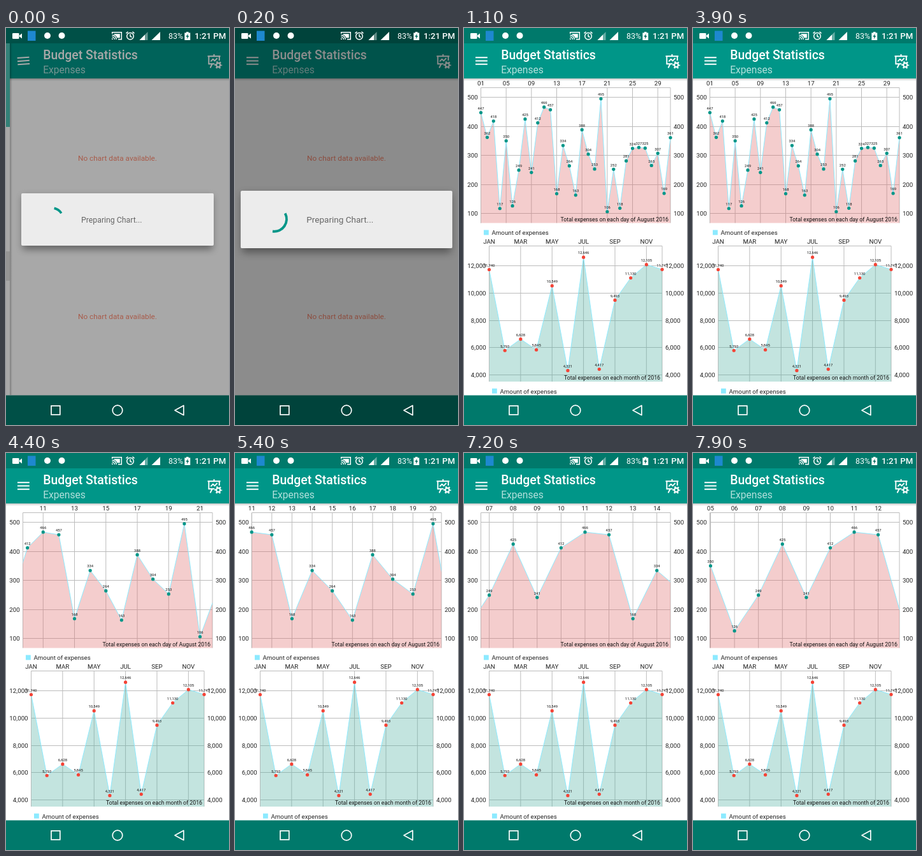
These frames come from a looping animation (350x622 px, 8000 ms). An HTML page:

```html
<!DOCTYPE html>
<html lang="en">
<head>
<meta charset="utf-8">
<title>Budget Statistics</title>
<style>
  html, body { margin: 0; width: 100%; height: 100%; overflow: hidden; background: #fff; }
  svg { display: block; width: 100vw; height: 100vh; }
  text { font-family: Roboto, "Noto Sans", sans-serif; white-space: pre; }
  .axis { font-size: 9.72px; fill: #222; }
  .value { font-size: 5.83px; fill: #111; text-anchor: middle; }
  .note { font-size: 8.75px; fill: #111; text-anchor: end; }
  .empty { font-size: 11.8px; fill: #ff8a70; text-anchor: middle; }
  .mid { text-anchor: middle; }
  .end { text-anchor: end; }
  .grid { stroke: #bcbcbc; fill: none; }
  .line { stroke: #8ceaff; fill: none; }
</style>
</head>
<body>
<svg viewBox="0 0 350 622" preserveAspectRatio="none">
  <defs>
    <clipPath id="clipDay"><rect x="26.5" y="93.5" width="297.5" height="212"/></clipPath>
    <clipPath id="clipMonth"><rect x="39.5" y="341.5" width="271.5" height="212.5"/></clipPath>
    <linearGradient id="fall" x2="0" y2="1">
      <stop stop-color="#000" stop-opacity=".22"/><stop offset="1" stop-color="#000" stop-opacity="0"/>
    </linearGradient>
    <linearGradient id="side">
      <stop stop-color="#000" stop-opacity=".25"/><stop offset="1" stop-color="#000" stop-opacity="0"/>
    </linearGradient>
    <filter id="blur" x="-20%" y="-40%" width="140%" height="180%"><feGaussianBlur stdDeviation="6"/></filter>
  </defs>

  <rect width="350" height="622" fill="#fff"/>
  <g id="empty">
    <text class="empty" x="175" y="207.5">No chart data available.</text>
    <text class="empty" x="175" y="456">No chart data available.</text>
  </g>
  <g id="charts"><g id="day"></g><g id="month"></g></g>

  <rect y="79" width="350" height="4" fill="url(#fall)"/>
  <rect y="24" width="350" height="55" fill="#009688"/>
  <text x="58.2" y="49" font-size="19.44" font-weight="500" fill="#fff">Budget Statistics</text>
  <text x="58.2" y="71" font-size="15.6" fill="#fff" opacity=".7">Expenses</text>
  <path id="menu" d="M18 46.3H36.8M18 51.5H36.8M18 56.7H36.8" stroke="#fff" stroke-width="2"/>
  <g fill="none" stroke="#fff" stroke-width="1.9">
    <path d="M316.5 44.2H336.5M318.3 44V56.3H328M334.8 44V51M326.5 41V44M323.5 56.5L320.5 62.5M321.3 52.3L324.8 48.8L327.6 51.4L331.6 47.2"/>
    <circle cx="333.2" cy="58" r="6.6" fill="#009688" stroke="none"/>
    <circle cx="333.2" cy="58" r="3.1" stroke-width="2.2"/>
    <circle cx="333.2" cy="58" r="5" stroke-width="2" stroke-dasharray="2.4 2.836" stroke-dashoffset="1.2"/>
  </g>

  <g id="drawer">
    <rect x="6" y="24" width="4" height="551" fill="url(#side)"/>
    <rect y="24" width="6" height="551" fill="#fff"/>
    <rect y="24" width="6" height="131" fill="#4dc3b6"/>
    <rect y="350" width="6" height="46" fill="#e2e2e2"/>
  </g>

  <rect width="350" height="24" fill="#00796b"/>
  <rect y="575.5" width="350" height="46.5" fill="#00796b"/>
  <rect id="dim" width="350" height="622" fill="#000"/>

  <g fill="#fff">
    <rect x="10" y="8" width="10.5" height="9" rx="1.2"/>
    <path d="M20 12.5L25 8.5V16.5Z"/>
    <rect x="34" y="4.5" width="12.5" height="15.5" fill="#1e88cf"/>
    <circle cx="65" cy="12" r="5"/>
    <circle cx="87.500" cy="12" r="5"/>
    <g fill="none" stroke="#fff" stroke-width="1.5">
      <path d="M166.700 9V6.700H181.300V17.800H176"/>
      <path d="M166.500 11.200A6.700 6.700 0 0 1 173.200 18M166.500 14A4 4 0 0 1 170.400 18"/>
      <circle cx="195" cy="12.700" r="5.300"/>
      <path d="M195 9.500V13L197.500 14.500M188.500 8.300L191.500 5.800M201.500 8.300L198.500 5.800"/>
    </g>
    <path d="M169.500 9.200H178.800V15.400H174.500Q173 11.500 169.500 10.500ZM166 16A2 2 0 0 1 168 18H166Z"/>
    <path d="M222.500 6V19H209.500Z" opacity=".4"/>
    <path d="M218 10.500V19H209.500Z"/>
    <path d="M242 6V19H228.500Z"/>
    <text x="255" y="17" font-size="12.4">83%</text>
    <path d="M280.300 7.500H283V6H286.500V7.500H289.200V19H280.300Z"/>
    <path d="M285.800 8.800L282.300 13.800H284.500L283.800 17.500L287.300 12.300H285.100Z" fill="#00695c"/>
    <text x="296" y="17" font-size="13.2" font-weight="500">1:21 PM</text>
  </g>
  <g fill="none" stroke="#fff" stroke-width="1.7">
    <rect x="71" y="592" width="13.800" height="13.800"/>
    <circle cx="175" cy="599" r="7.800"/>
    <path d="M265 599L278.800 591.500V606.500Z" stroke-linejoin="round"/>
  </g>

  <g id="dialog">
    <rect x="26" y="264" width="298" height="83" fill="#000" opacity=".4" filter="url(#blur)"/>
    <rect x="24" y="259" width="302" height="82" rx="2" fill="#ececec"/>
    <path id="spinner" fill="none" stroke="#009688" stroke-width="3.6"/>
    <text x="118" y="304.500" font-size="12.3" fill="#666">Preparing Chart...</text>
  </g>
</svg>
<script>
const LOOP = 8000, STEP = 100;
const $ = id => document.getElementById(id);

const days = [447, 362, 418, 117, 350, 126, 249, 425, 241, 412, 466, 457, 168, 334, 264, 163,
  388, 304, 253, 495, 106, 252, 118, 281, 324, 327, 325, 265, 307, 169, 361];
const months = [11740, 5793, 6628, 5845, 10549, 4321, 12646, 4417, 9493, 11130, 12105, 11747];

const dayChart = {
  values: days, names: days.map((_, i) => String(i + 1).padStart(2, '0')),
  left: 26.5, right: 324, top: 93.5, bottom: 305.5,
  base: 100, baseY: 290.5, unit: 0.455, ticks: [100, 200, 300, 400, 500], labelRoom: 3.1,
  fill: 'rgba(222,105,105,.333)', dot: '#009688', clip: 'clipDay',
  note: 'Total expenses on each day of August 2016', legendY: 324.3
};
const monthChart = {
  values: months, names: 'JAN FEB MAR APR MAY JUN JUL AUG SEP OCT NOV DEC'.split(' '),
  left: 39.5, right: 311, top: 341.5, bottom: 554,
  base: 4000, baseY: 543.5, unit: 0.02132, ticks: [4000, 6000, 8000, 10000, 12000], labelRoom: 2,
  fill: 'rgba(75,174,159,.333)', dot: '#f44336', clip: 'clipMonth',
  note: 'Total expenses on each month of 2016', legendY: 572.6
};

const text = (cls, x, y, str) => `<text class="${cls}" x="${x}" y="${y}">${str}</text>`;
const number = v => v.toLocaleString('en-US');
const snap = y => Math.floor(y) + 0.5;

// Linear track through [time, value] pairs, held at both ends.
function track(keys, t) {
  if (t <= keys[0][0]) return keys[0][1];
  for (let i = 1; i < keys.length; i++) {
    const [t0, a] = keys[i - 1], [t1, b] = keys[i];
    if (t <= t1) return a + (b - a) * (t - t0) / (t1 - t0);
  }
  return keys[keys.length - 1][1];
}

function drawChart(c, phase, scale, shift) {
  const { left, right, top, bottom } = c;
  const gap = (right - left) / (c.values.length - 1) * scale;
  const xAt = i => left + i * gap + shift;
  const yAt = v => c.baseY - (v - c.base) * c.unit;
  const inside = x => x > left - 0.4 && x < right + 0.4;
  const every = Math.ceil(c.labelRoom / scale);
  let grid = `M${left} ${top}H${right}V${bottom}M${left} ${top}V${bottom}`;
  let labels = '', dots = '', tags = '';

  for (const v of c.ticks) {
    const y = yAt(v);
    grid += `M${left} ${snap(y)}H${right}`;
    labels += text('axis end', left - 4.9, y + 3.5, number(v)) + text('axis', right + 4.9, y + 3.5, number(v));
  }
  const points = c.values.map((v, i) => {
    const x = xAt(i), y = yAt(v * phase);
    if (inside(x)) {
      if (i % every === 0) {
        grid += `M${x} ${top}V${bottom}`;
        labels += text('axis mid', x, top - 3.7, c.names[i]);
      }
      if (y < bottom) {
        dots += `<circle cx="${x}" cy="${y}" r="2.6" fill="${c.dot}"/>`;
        tags += text('value', x, y - 4.7, number(v));
      }
    }
    return `${x} ${y}`;
  }).join('L');

  return `<path class="grid" d="${grid}"/>
    <g clip-path="url(#${c.clip})">
      <path d="M${xAt(0)} ${bottom + 60}L${points}V${bottom + 60}Z" fill="${c.fill}"/>
      <path class="line" d="M${points}"/>
    </g>${labels}${dots}${tags}
    <rect x="${left + 4.5}" y="${c.legendY - 7.8}" width="7.8" height="7.8" fill="#8ceaff"/>
    ${text('axis', left + 17, c.legendY, 'Amount of expenses')}
    ${text('note', right - 3, bottom - 2.7, c.note)}`;
}

function drawDialog(t) {
  const grow = track([[0, 1], [100, 1.09], [200, 1.1]], t);
  $('dialog').setAttribute('opacity', track([[200, 1], [300, 0.25], [400, 0]], t));
  $('dialog').setAttribute('transform', `translate(175 300) scale(${grow}) translate(-175 -300)`);
  const point = deg => {
    const a = deg * Math.PI / 180;
    return `${72 + 17.5 * Math.cos(a)} ${299.5 + 17.5 * Math.sin(a)}`;
  };
  const from = -78 + t * 0.25, sweep = 46 + t * 0.4;
  $('spinner').setAttribute('d', `M${point(from)}A17.5 17.5 0 0 1 ${point(from + sweep)}`);
}

function render(t) {
  const ready = t >= 300;
  $('empty').style.display = ready ? 'none' : '';
  $('charts').style.display = ready ? '' : 'none';
  $('drawer').style.display = t < 100 ? '' : 'none';
  $('menu').setAttribute('transform', t < 100 ? 'rotate(-4 27.4 51.5)' : '');
  $('dim').setAttribute('opacity', track([[0, 0.34], [100, 0.5], [200, 0.45], [300, 0.25], [400, 0.1], [500, 0]], t));
  drawDialog(t);
  if (!ready) return;

  const rise = track([[300, 0], [1100, 1]], t);
  const phase = 0.5 - 0.5 * Math.cos(Math.PI * rise);
  // Pinch around the middle of the plot, then drag toward earlier days.
  const pinch = track([[3900, 0], [4700, 1]], t);
  const scale = 1 + 2.17 * pinch * pinch * (3 - 2 * pinch)
    + track([[5300, 0], [5400, 0.02], [5800, 0.62]], t);
  const shift = t < 6200 ? -144.6 * (scale - 1)
    : track([[6100, -403.4], [7000, -236], [7200, -212.4], [7900, -149.3]], t);
  $('day').innerHTML = drawChart(dayChart, phase, scale, shift);
  $('month').innerHTML = drawChart(monthChart, phase, 1, 0);
}

const start = performance.now();
let shown = -1;
function tick() {
  const t = Math.floor((performance.now() - start) % LOOP / STEP) * STEP;
  if (t !== shown) render(shown = t);
  requestAnimationFrame(tick);
}
tick();
</script>
</body>
</html>
```
